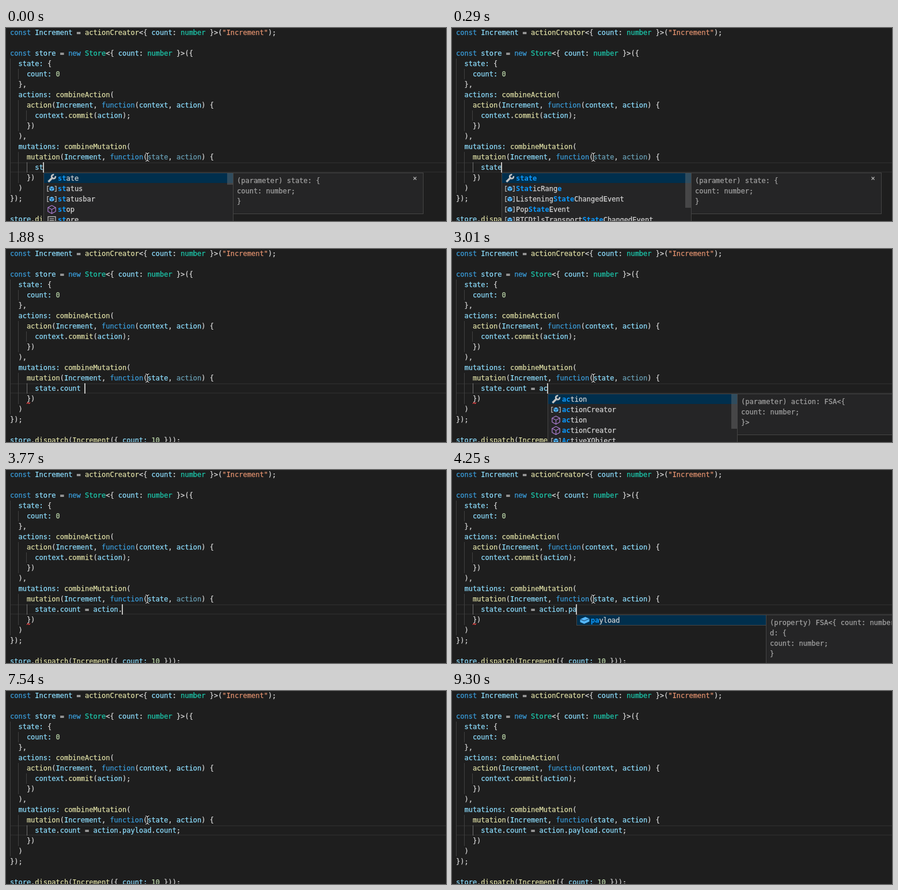
Animation of 764x335 px, one loop 9.4 s. Source, as an HTML page with a canvas:

```html
<!DOCTYPE html>
<html lang="en">
<head>
<meta charset="utf-8">
<style>
  html, body { margin: 0; width: 100%; height: 100%; overflow: hidden; background: #1e1e1e; }
  canvas { display: block; }
</style>
</head>
<body>
<canvas width="764" height="335"></canvas>
<script>
const ctx = document.querySelector('canvas').getContext('2d');
const LOOP = 9400, LEFT = 7, CHAR = 7.224, ROW = 18, EDIT_ROW = 13;
const FONT = '12px "DejaVu Sans Mono", monospace';
const COLOR = {
  keyword: '#3a9ddb', type: '#1ccbae', func: '#dedea5', name: '#8ddeff',
  string: '#e2926f', number: '#b5cfa4', plain: '#d4d4d4'
};

const code = `const Increment = actionCreator<{ count: number }>("Increment");

const store = new Store<{ count: number }>({
  state: {
    count: 0
  },
  actions: combineAction(
    action(Increment, function(context, action) {
      context.commit(action);
    })
  ),
  mutations: combineMutation(
    mutation(Increment, function(state, action) {

    })
  )
});

store.dispatch(Increment({ count: 10 }));`.split('\n');
const typed = 'state.count = action.payload.count;';

// Indent guides: column, first row, last row
const guides = [[0, 3, 15], [2, 4, 4], [2, 7, 9], [2, 12, 14], [4, 8, 8]];

// Suggestion lists: items as icon:label, details, scrollbar thumb height
const stateDoc = ['(parameter) state: {', 'count: number;', '}'];
const countList = { items: ['field:count'], doc: ['(property) count: number'] };
const payloadDoc = ['(property) FSA<{ count: number; }>.payloa', 'd: {', 'count: number;', '}'];
const lists = {
  st: { items: ['wrench:state', 'var:status', 'var:statusbar', 'method:stop', 'word:store'], doc: stateDoc, thumb: 20 },
  sta: { items: ['wrench:state', 'var:status', 'var:statusbar', 'var:StaticRange', 'var:ListeningStateChangedEvent'], doc: stateDoc, thumb: 40 },
  state: { items: ['wrench:state', 'var:StaticRange', 'var:ListeningStateChangedEvent', 'var:PopStateEvent', 'var:RTCDtlsTransportStateChangedEvent'], doc: stateDoc, thumb: 60 },
  action: { items: ['wrench:action', 'var:actionCreator', 'method:action', 'method:actionCreator', 'var:ActiveXObject'], doc: ['(parameter) action: FSA<{', 'count: number;', '}>'], thumb: 60 },
  count: countList,
  payload: { items: ['field:payload'], doc: payloadDoc },
  payloadShort: { items: ['field:payload'], doc: payloadDoc.slice(0, 1) }
};

// Time, number of typed characters, open list
const steps = [
  [0, 2, 'st'], [60, 3, 'sta'], [120, 4, 'sta'], [230, 5, 'state'], [640, 6], [700, 6, 'count'],
  [1050, 7, 'count'], [1110, 8, 'count'], [1220, 9, 'count'], [1520, 10, 'count'], [1640, 11, 'count'],
  [1880, 12], [2120, 13], [2240, 14], [2720, 15], [2780, 15, 'action'], [2900, 16, 'action'],
  [3250, 17, 'action'], [3310, 18, 'action'], [3420, 19, 'action'], [3530, 20, 'action'], [3770, 21],
  [4070, 22, 'payload'], [4190, 23, 'payload'], [4600, 24, 'payloadShort'], [5020, 28],
  [5380, 29], [5680, 30], [5740, 30, 'count'], [5980, 31, 'count'], [6040, 32, 'count'], [6580, 34], [7060, 35]
];

const colX = col => LEFT + col * CHAR;
const within = (t, ...spans) => spans.some(([a, b]) => t >= a && t < b);

function rect(x, y, w, h, color) {
  ctx.fillStyle = color;
  ctx.fillRect(x, y, w, h);
}

function panel(x, y, w, h) {
  rect(x, y, w, h, '#454545');
  rect(x + 1, y + 1, w - 2, h - 2, '#252526');
}

function path(points, color, width, fill) {
  ctx.beginPath();
  points.forEach(([x, y]) => ctx.lineTo(x, y));
  if (fill) { ctx.fillStyle = fill; ctx.fill(); }
  if (width) { ctx.strokeStyle = color; ctx.lineWidth = width; ctx.stroke(); }
}

function text(str, x, y, color, bold) {
  ctx.font = (bold ? 'bold ' : '') + FONT;
  ctx.fillStyle = ctx.strokeStyle = color;
  ctx.lineWidth = 0.25;
  ctx.fillText(str, x, y);
  if (!bold) ctx.strokeText(str, x, y);
}

function tokenColor(token, next) {
  if (/^"/.test(token)) return COLOR.string;
  if (/^(const|new|function)$/.test(token)) return COLOR.keyword;
  if (/^(Store|number)$/.test(token)) return COLOR.type;
  if (/^\d/.test(token)) return COLOR.number;
  if (!/^\w/.test(token)) return COLOR.plain;
  return next === '(' || next === '<' ? COLOR.func : COLOR.name;
}

function codeLine(line, row, isDim) {
  for (const m of line.matchAll(/"[^"]*"|\w+(?::(?! number))?|[^\w"]+/g)) {
    const next = line[m.index + m[0].length];
    ctx.globalAlpha = isDim(m.index) ? 0.62 : 1;
    text(m[0], colX(m.index), 12 + row * ROW, tokenColor(m[0], next));
  }
  ctx.globalAlpha = 1;
}

function squiggle(col, length, row) {
  const points = [], end = colX(col + length);
  for (let x = Math.round(colX(col)), i = 0; x <= end; x += 2, i++) {
    points.push([x, row * ROW + (i % 2 ? 14.5 : 16.5)]);
  }
  path(points, '#f04545', 1.2);
}

function cube(x, y, r, color, solid) {
  const w = r * 0.95, h = r * 0.5;
  const outline = [[x, y - r], [x + w, y - h], [x + w, y + h], [x, y + r], [x - w, y + h], [x - w, y - h], [x, y - r]];
  path(outline, color, 1.2, solid && color);
  path([[x - w, y - h], [x, y], [x + w, y - h]], solid ? '#1e4a6b' : color, 1.1);
  path([[x, y], [x, y + r]], solid ? '#1e4a6b' : color, 1.1);
}

const icons = {
  wrench(x, y) {
    path([[x - 6, y + 6], [x + 2, y - 2]], '#c5c5c5', 3.4);
    ctx.beginPath();
    ctx.arc(x + 3, y - 3, 3.4, -0.25, 4.95);
    ctx.lineWidth = 2.6;
    ctx.stroke();
  },
  var(x, y) {
    for (const s of [-1, 1]) {
      path([[x + s * 5, y - 4.5], [x + s * 7.5, y - 4.5], [x + s * 7.5, y + 4.5], [x + s * 5, y + 4.5]], '#c5c5c5', 1.2);
    }
    cube(x, y, 3.6, '#55b8ff', true);
  },
  method(x, y) { cube(x, y, 7, '#b180d7'); },
  field(x, y) {
    path([[x - 8, y - 2], [x + 1, y - 6], [x + 8, y - 3], [x + 8, y + 2], [x - 1, y + 6], [x - 8, y + 3]], '', 0, '#55b8ff');
    path([[x - 8, y - 2], [x - 1, y + 1], [x + 8, y - 3]], '#1e4a6b', 1.1);
  },
  word(x, y) {
    ctx.strokeStyle = '#c5c5c5';
    ctx.lineWidth = 1.3;
    ctx.strokeRect(x - 6.5, y - 5.5, 13, 11);
    for (const dy of [-2, 1]) path([[x - 4, y + dy], [x + 4, y + dy]], '#c5c5c5', 1.2);
  }
};

// Indices of the label characters that match the query
function matches(label, query) {
  const lower = label.toLowerCase(), start = lower.indexOf(query);
  let from = 0;
  return new Set([...query].map((ch, i) => {
    if (start >= 0) return start + i;
    const at = lower.indexOf(ch, from);
    from = at + 1;
    return at;
  }));
}

function suggestions({ items, doc, thumb }, x, query) {
  panel(x, 251, 330, items.length > 1 ? 218 : 19);
  rect(x + 1, 252, 328, 17, '#002f4d');
  items.forEach((item, i) => {
    const [icon, label] = item.split(':'), y = 261 + i * ROW, hit = matches(label, query);
    icons[icon](x + 14.5, y);
    [...label].forEach((ch, k) =>
      text(ch, x + 25 + k * CHAR, y + 4, hit.has(k) ? '#0a99ff' : COLOR.plain, hit.has(k)));
  });
  if (thumb) rect(x + 319, 252, 10, thumb, 'rgba(121,121,121,.4)');

  panel(x + 329, 251, 331, doc.length * ROW + 18);
  doc.forEach((line, i) => text(line, x + 336, 269 + i * ROW, '#a2a2a2'));
  const cx = x + 645;
  path([[cx - 2.5, 258.5], [cx + 2.5, 263.5]], '#b0b0b0', 1.2);
  path([[cx - 2.5, 263.5], [cx + 2.5, 258.5]], '#b0b0b0', 1.2);
}

function pointer(t) {
  const p = Math.min(1, Math.max(0, (t - 8050) / 610));
  if (p === 1) return;
  const e = p * p * (3 - 2 * p), x = 245.5 + 486 * e, y = 224 + 122 * e;
  for (const [color, width] of [['#000', 3], ['#e8e8e8', 1.2]]) {
    path([[x, y - 6], [x, y + 6]], color, width);
    for (const s of [-1, 1]) path([[x - 3, y + s * 7.5], [x, y + s * 6], [x + 3, y + s * 7.5]], color, width);
  }
}

function draw(t) {
  const [, count, list] = steps.findLast(step => step[0] <= t);
  const line = typed.slice(0, count), col = 6 + count;

  rect(0, 0, 764, 335, '#1e1e1e');
  rect(LEFT, 233, 757, 2, '#282828');
  rect(LEFT, 249, 757, 2, '#282828');
  for (const [c, first, last] of guides) {
    rect(Math.floor(colX(c)), first * ROW - 1, 1, (last - first + 1) * ROW, '#404040');
  }
  rect(36, 233, 1, ROW, '#707070');

  code.forEach((str, row) => codeLine(str, row, c =>
    row === 12 && (c === 33 && t < 700 || c === 40 && t < 4190)));
  codeLine(' '.repeat(6) + line, EDIT_ROW, () => false);

  if (within(t, [1110, 3830], [4190, 4600], [5500, 6400])) squiggle(4, 1, 14);
  if (within(t, [5080, 5380])) squiggle(6, 11, EDIT_ROW);
  if (within(t, [6400, 6940])) squiggle(35, 3, EDIT_ROW);

  if (!within(t, [7540, 8080], [8580, 9020], [9300, LOOP])) {
    rect(Math.round(colX(col) - 1), 233, 2, ROW, '#c0c0be');
  }
  if (list) suggestions(lists[list], Math.round(colX(col)), line.match(/\w*$/)[0]);
  pointer(t);
}

function frame() {
  draw(performance.now() % LOOP);
  requestAnimationFrame(frame);
}
frame();
</script>
</body>
</html>
```
